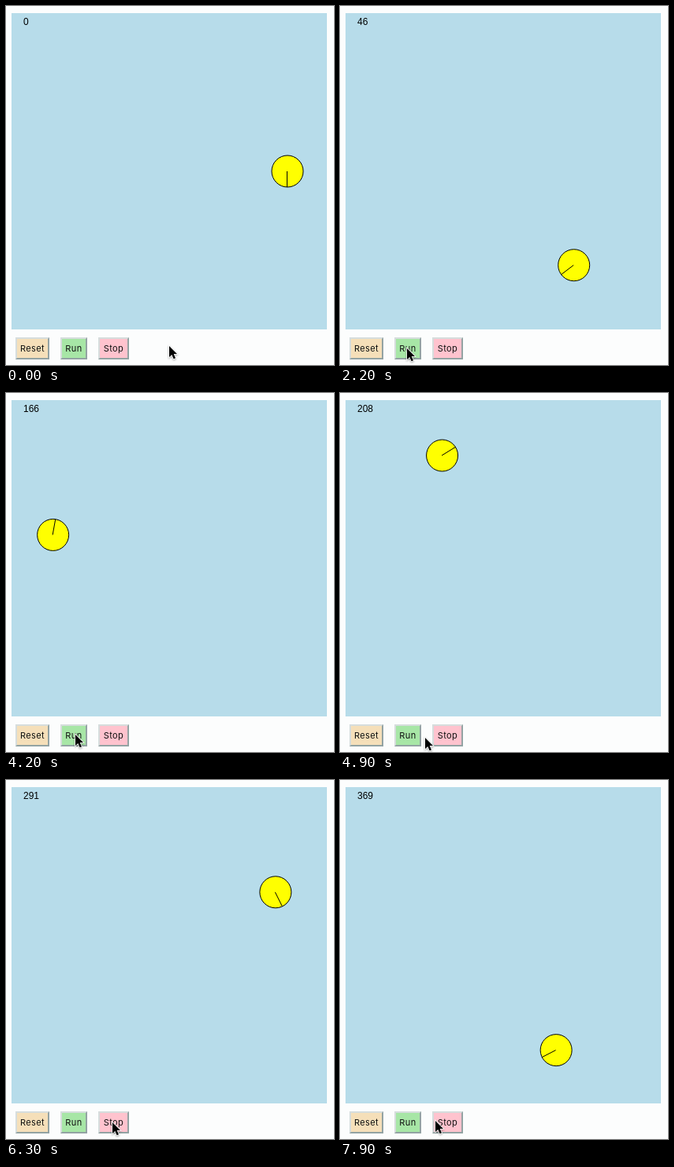
Animation of 416 by 454 pixels, one loop 8000 ms. Source, as an HTML page:

```html
<!DOCTYPE html>
<html lang="en">
<head>
<meta charset="utf-8">
<title>Circling robot</title>
<style>
  html, body { margin: 0; width: 100%; height: 100%; overflow: hidden; background: #fcfdfd; }
  svg { position: absolute; left: 0; top: 0; }
  #count { font: 12px "Liberation Sans", Arial, sans-serif; }
  .button {
    position: absolute; top: 419px; height: 28px; box-sizing: border-box;
    border: 2px solid; border-color: #d6dddd #93a3a3 #93a3a3 #d6dddd;
    font: 11px/24px Inter, sans-serif; letter-spacing: .4px;
    text-align: center; color: #111;
  }
  .button.pressed { border-color: #93a3a3 #d6dddd #d6dddd #93a3a3; }
  #cursor { filter: drop-shadow(0 1px 1px rgba(0, 0, 0, .35)); }
</style>
</head>
<body>
<svg width="416" height="454">
  <rect x="7" y="9" width="400" height="400" fill="#b7dcea"/>
  <text id="count" x="22" y="24">0</text>
  <g id="robot" stroke="#000">
    <circle r="20" fill="#ff0"/>
    <path id="heading"/>
  </g>
</svg>
<div class="button" style="left:12px; width:43px; background:#f5dfb9">Reset</div>
<div class="button" id="run" style="left:69px; width:34px; background:#a7e6a6">Run</div>
<div class="button" id="stop" style="left:117px; width:39px; background:#ffc3ce">Stop</div>
<svg width="416" height="454">
  <path id="cursor" d="M0 0V14L3.3 11L5.6 16.3L8 15.3L5.7 10H10Z"
        stroke="#fff" stroke-width="1.6" paint-order="stroke"/>
</svg>
<script>
const LOOP = 8000, TICK = 100;
const TURN = 0.02, SPEED = 3, RADIUS = SPEED / TURN;
const STEPS_PER_MS = 0.059815, LAST_STEP = 369;
const $ = id => document.getElementById(id);

// Pointer path: time, x, y
const pointer = [
  [200, 207, 430], [600, 150, 434], [1100, 88, 433], [1200, 85, 432], [1400, 85, 433],
  [2600, 85, 433], [2700, 87, 432], [3600, 87, 432], [3700, 88, 432],
  [4600, 88, 432], [4900, 108, 436], [5300, 135, 433],
  [7600, 135, 433], [7900, 121, 431]
];

function pointerAt(t) {
  const next = pointer.findIndex(p => p[0] > t);
  if (next === 0) return pointer[0].slice(1);
  if (next < 0) return pointer[pointer.length - 1].slice(1);
  const [t0, x0, y0] = pointer[next - 1], [t1, x1, y1] = pointer[next];
  const k = (t - t0) / (t1 - t0);
  return [Math.round(x0 + (x1 - x0) * k), Math.round(y0 + (y1 - y0) * k)];
}

function draw(t) {
  const steps = Math.round(46 + (t - 2200) * STEPS_PER_MS);
  const n = Math.max(0, Math.min(LAST_STEP, steps));

  // The robot turns, then moves, so it runs half a turn ahead of its heading.
  const a = (n + 0.5) * TURN, h = n * TURN;
  const x = 207 + RADIUS * Math.cos(a), y = 207.5 + RADIUS * Math.sin(a);
  $("robot").setAttribute("transform", `translate(${x} ${y})`);
  $("heading").setAttribute("d", `M-.5 0l${-20 * Math.sin(h)} ${20 * Math.cos(h)}`);
  $("count").textContent = n;

  $("run").classList.toggle("pressed", t === 1400);
  $("stop").classList.toggle("pressed", t === 7600);
  $("cursor").setAttribute("transform", `translate(${pointerAt(t)})`);
}

const start = performance.now();
function frame() {
  const t = (performance.now() - start) % LOOP;
  draw(Math.floor(t / TICK) * TICK);
  requestAnimationFrame(frame);
}
frame();
</script>
</body>
</html>
```
